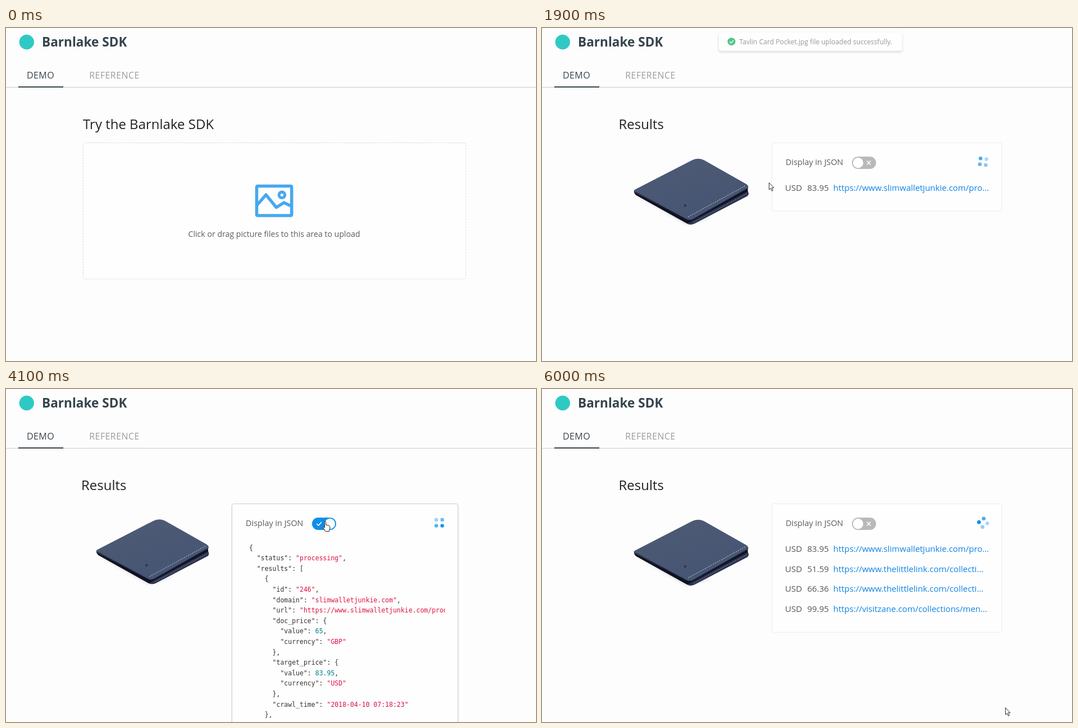
An HTML page for the animation above (6100 ms loop, 944 by 593 pixels).

```html
<!DOCTYPE html>
<html lang="en">
<head>
<meta charset="utf-8">
<title>SDK demo</title>
<style>
  html, body { margin: 0; width: 100%; height: 100%; overflow: hidden; background: #fdfdfd; }
  svg { display: block; width: 944px; height: 593px; font-family: "Open Sans", "Noto Sans", sans-serif; }
  text { white-space: pre; }
  .title { font-size: 24px; fill: #222; }
  .tab { font-size: 16px; letter-spacing: .4px; fill: #36434b; }
  .row { font-size: 15px; fill: #575757; }
  .link { font-size: 15px; fill: #0f84e6; }
  .json { font: 11.5px "DejaVu Sans Mono", monospace; fill: #333; }
  .str { fill: #d14; }
  .num { fill: #008080; }
  #card { fill: #fefefe; stroke: #ebebeb; }
  #card.hover { stroke: #cfcfcf; filter: drop-shadow(0 1px 1px rgba(0, 0, 0, .14)); }
  #toastBox { fill: #fff; filter: drop-shadow(0 2px 2px rgba(0, 0, 0, .24)); }
</style>
</head>
<body>
<svg viewBox="0 0 944 593">
  <defs>
    <filter id="soft" x="-20%" y="-20%" width="140%" height="140%"><feGaussianBlur stdDeviation="3"/></filter>
    <linearGradient id="leather" x1="0" y1="0" x2=".5" y2="1">
      <stop offset="0" stop-color="#4e5b76"/><stop offset="1" stop-color="#465572"/>
    </linearGradient>
    <clipPath id="codeClip"><rect x="420" y="265" width="362" height="328"/></clipPath>
  </defs>
  <rect width="944" height="593" fill="#fdfdfd"/>

  <circle cx="36.8" cy="25" r="13.2" fill="#2fc9c4"/>
  <text x="64" y="33" font-size="22.6" font-weight="700" fill="#35434c">Barnlake SDK</text>
  <text class="tab" x="37" y="90">DEMO</text>
  <text class="tab" x="148.3" y="90" style="fill:#9c9c9c">REFERENCE</text>
  <path d="M0 105.5H944" stroke="#c9c9c9"/>
  <path d="M22 105H102" stroke="#35434c" stroke-width="2"/>

  <g id="upload">
    <text class="title" x="137" y="180">Try the Barnlake SDK</text>
    <rect id="drop" x="137.5" y="204.5" width="681.5" height="242.5" rx="4" fill="#fefefe" stroke="#d9d9d9" stroke-dasharray="3 2"/>
    <g fill="none" stroke="#46a8f0" stroke-width="5.5">
      <rect x="446.5" y="281.5" width="62.3" height="52.5" rx="1.5"/>
      <path d="M447 315.5L463 297L481.5 319.5L495 311L509 317.5" stroke-linejoin="round"/>
      <circle cx="491.5" cy="297.3" r="5.2" stroke-width="5.2"/>
    </g>
    <text x="324.5" y="371.5" font-size="14.15" fill="#5c5c5c">Click or drag picture files to this area to upload</text>
  </g>

  <g id="results">
    <text id="heading" class="title" y="180">Results</text>
    <g id="wallet">
      <path d="M172 299L258 349L300 337L262 330Z" fill="#a9aec6" opacity=".6" filter="url(#soft)"/>
      <path d="M164 289Q163 294 168 298L256 347Q264 352 272 348L366 299Q369 296 367 292L366 282L262 336Z" fill="#10121f"/>
      <path d="M262 347L366 291Q370 294 366 299L272 348Q264 352 258 348Z" fill="#2c3450"/>
      <path d="M165 288L266 236Q277 230 288 235L364 278Q370 282 366 286L270 340Q263 344 256 340L166 293Q163 290 165 288Z" fill="url(#leather)"/>
      <path d="M167 292L256 340Q263 344 270 340L367 285" fill="none" stroke="#1f2740" stroke-width="1.2"/>
      <g fill="none" stroke="#d7dbe6" stroke-width=".9" stroke-dasharray="2.4 1.8">
        <path d="M260 336.5L363 280.5"/><path d="M270 346L365 295" opacity=".55"/>
      </g>
      <circle cx="255" cy="316" r="2.2" fill="#2b354f"/>
    </g>
    <rect id="card" y="204.5" rx="3"/>
    <g id="head">
      <text x="434" y="244" font-size="14.4" fill="#5c5c5c">Display in JSON</text>
      <rect id="track" x="552" y="229" width="43" height="22" rx="11"/>
      <path id="cross" d="M578.5 236.5L585.5 243.5M585.5 236.5L578.5 243.5" stroke="#fff" stroke-width="1.6"/>
      <path id="tick" d="M553.5 240L556.5 243L562 237" transform="translate(7 0)" fill="none" stroke="#fff" stroke-width="1.6"/>
      <circle id="knob" cy="240" r="9.2" fill="#fff"/>
    </g>
    <g id="spinner" fill="#108ee9"></g>
    <g id="rows"></g>
    <g id="code" clip-path="url(#codeClip)"></g>
  </g>

  <g id="toast">
    <rect id="toastBox" x="315" y="13.5" width="326.5" height="32.5" rx="4"/>
    <circle cx="337.5" cy="29.5" r="7" fill="#00a854"/>
    <path d="M334.2 29.6L336.7 32.1L341 27.4" fill="none" stroke="#fff" stroke-width="1.5"/>
    <text x="351.5" y="34" font-size="12.1" fill="#666">Tavlin Card Pocket.jpg file uploaded successfully.</text>
  </g>

  <g id="cursor" fill="#fff" stroke="#222" stroke-linejoin="round">
    <path id="arrow" d="M.5 .5V13L3.3 10.4L5.4 15.2L7.4 14.3L5.3 9.6H9Z" stroke-width=".95"/>
    <path id="hand" d="M3 1.2Q3 0 4.2 0T5.4 1.2V6.2Q9 5.8 11.3 7.5Q13 8.8 12.4 12L11 17.5H4.6L.4 11.2Q-.2 9.4 1.2 9.3L3 11Z"/>
  </g>
</svg>
<script>
const LOOP = 6100, STEP = 100;
const $ = id => document.getElementById(id);
const set = (el, attrs) => { for (const k in attrs) el.setAttribute(k, attrs[k]); return el; };
const add = (parent, tag, attrs, text = '') => {
  const el = set(document.createElementNS(parent.namespaceURI, tag), attrs);
  el.textContent = text;
  return parent.appendChild(el);
};
const show = (id, on) => { $(id).style.display = on ? '' : 'none'; };
const ramp = (t, from, to) => Math.min(1, Math.max(0, (t - from) / (to - from)));

// Linear lookup in rows of [time, ...values]
function sample(keys, t) {
  let i = 0;
  while (i < keys.length - 2 && t >= keys[i + 1][0]) i++;
  const a = keys[i], b = keys[i + 1], p = ramp(t, a[0], b[0]);
  return a.slice(1).map((v, j) => v + (b[j + 1] - v) * p);
}

const POINTER = [
  [100, 10, 300], [600, 404, 274], [1300, 404, 274], [2500, 404, 276], [2900, 404, 276],
  [3300, 467, 259], [3700, 564.5, 236], [5500, 564.5, 236], [6000, 825, 567]
];
// Angle, then the opacity of each dot
const SPIN = [
  [900, -72, .5, .4, .7, .6], [1300, 48, .8, .35, .35, .4], [2500, 416, .7, .35, .6, .9],
  [3300, 675, .5, .35, 1, .9], [4100, 945, .4, .6, .95, .7],
  [5300, 1263, 1, .4, .7, 1], [6000, 1448, .35, .45, 1, .75]
];
const OFFERS = [
  ['83.95', 'https://www.slimwalletjunkie.com/pro…'],
  ['51.59', 'https://www.thelittlelink.com/collecti…'],
  ['66.36', 'https://www.thelittlelink.com/collecti…'],
  ['99.95', 'https://visitzane.com/collections/men…']
];
const JSON_LINES = `{
  "status": "processing",
  "results": [
    {
      "id": "246",
      "domain": "slimwalletjunkie.com",
      "url": "https://www.slimwalletjunkie.com/products/",
      "doc_price": {
        "value": 65,
        "currency": "GBP"
      },
      "target_price": {
        "value": 83.95,
        "currency": "USD"
      },
      "crawl_time": "2018-04-10 07:18:23"
    },`.split('\n');

const dots = [0, 1, 2, 3].map(() => add($('spinner'), 'circle', { r: 3.3 }));
const rows = OFFERS.map(([price, url], i) => {
  const g = add($('rows'), 'g', { transform: `translate(0 ${290 + i * 35.65})` });
  add(g, 'text', { class: 'row', x: 433 }, 'USD');
  add(g, 'text', { class: 'row', x: 472.5 }, price);
  add(g, 'text', { class: 'link', x: 518.8 }, url);
  return g;
});
JSON_LINES.forEach((line, i) => {
  const text = add($('code'), 'text', { class: 'json', x: 433, y: 286.5 + i * 18.6 });
  const [, key, value, tail] = line.match(/^(\s*(?:"\w+": )?)("[^"]*"|[\d.]+)?(.*)$/);
  add(text, 'tspan', {}, key);
  if (value) add(text, 'tspan', { class: value[0] === '"' ? 'str' : 'num' }, value);
  add(text, 'tspan', {}, tail);
});

function drawSpinner(t, cx) {
  const [angle, ...alpha] = sample(SPIN, t);
  dots.forEach((dot, i) => {
    const a = (angle + i * 90) * Math.PI / 180;
    set(dot, { cx: cx + 7.5 * Math.cos(a), cy: 238.2 + 7.5 * Math.sin(a), opacity: alpha[i] });
  });
}

function drawResults(t) {
  const json = t >= 3900 && t < 5200;
  const scale = json ? .982 : 1;
  const count = t < 1700 ? 0 : t < 2300 ? 1 : t < 5200 ? 2 : 4;
  const height = json ? 420 : count ? 86 + count * 35.65 : 70.5;
  set($('heading'), { x: json ? 134 : 136.5 });
  set($('wallet'), { transform: `translate(0 ${204 * (1 - scale)}) scale(${scale})` });
  set($('card'), {
    x: json ? 402.5 : 409.5, width: json ? 402.5 : 409.5, height,
    class: t >= 3000 && t < 5700 ? 'hover' : ''
  });
  set($('head'), { transform: `translate(${json ? -7 : 0} 0)` });

  const on = ramp(t, 3700, 3900) - ramp(t, 5000, 5200);
  set($('track'), { fill: on > .5 ? '#108ee9' : '#b9b9b9' });
  set($('knob'), { cx: 563 + 21 * on });
  show('tick', on > .5);
  show('cross', on <= .5);

  drawSpinner(t, json ? 771.7 : 785.7);
  show('code', json);
  show('rows', !json);
  rows.forEach((row, i) => { row.style.display = i < count ? '' : 'none'; });
}

function draw(t) {
  const uploading = t < 900;
  show('upload', uploading);
  show('results', !uploading);
  set($('drop'), { stroke: t >= 400 ? '#46a8f0' : '#d9d9d9' });
  if (!uploading) drawResults(t);

  const toast = ramp(t, 900, 1200) * (1 - ramp(t, 1800, 2100));
  set($('toast'), { opacity: toast, transform: `translate(0 ${-16 * (1 - toast)})` });

  const [x, y] = sample(POINTER, t);
  const hand = t >= 3600 && t <= 5500;
  set($('cursor'), { transform: `translate(${x} ${y})` });
  show('cursor', t >= 100);
  show('hand', hand);
  show('arrow', !hand);
}

const start = performance.now();
function tick() {
  const t = (performance.now() - start) % LOOP;
  draw(Math.floor(t / STEP) * STEP);
  requestAnimationFrame(tick);
}
draw(0);
requestAnimationFrame(tick);
</script>
</body>
</html>
```
